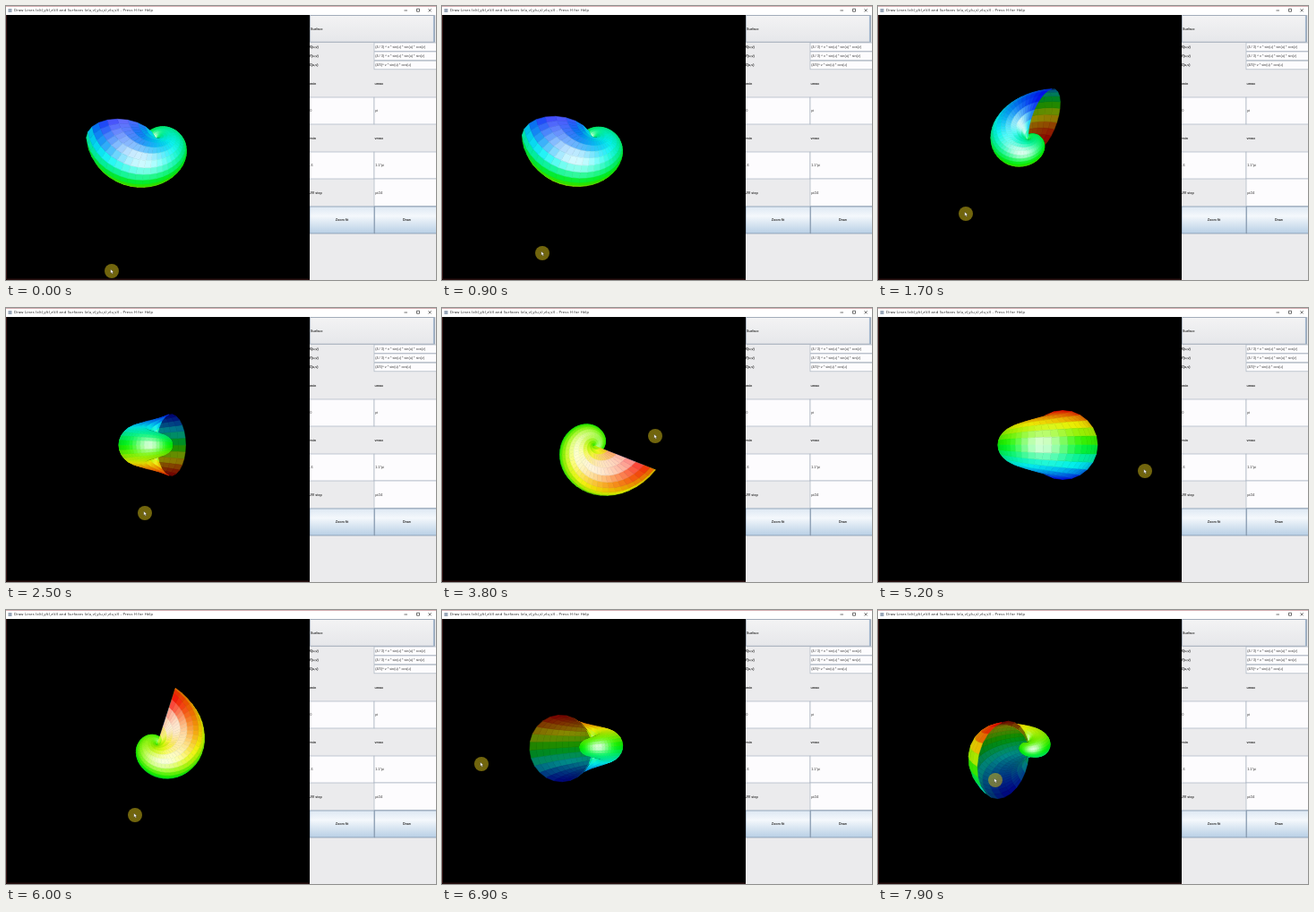
An HTML page with a canvas that plays this animation: 480x306 px, repeating every 8 s.

```html
<!DOCTYPE html>
<html lang="en">
<head>
<meta charset="utf-8">
<title>Surface viewer</title>
<style>
  html, body { margin: 0; width: 100%; height: 100%; overflow: hidden; background: #000; }
  canvas, svg { position: absolute; left: 0; top: 0; width: 480px; height: 306px; }
  text { font-family: "Liberation Sans", Arial, sans-serif; font-size: 3.8px; fill: #333; }
  .title { font-family: "Open Sans", sans-serif; font-size: 4px; fill: #111; }
  .label { font-size: 3.7px; font-weight: bold; }
  .mid { text-anchor: middle; }
  .field { fill: #fdfcfe; stroke: #aab4c0; stroke-width: .7; }
  .button { fill: url(#metal); stroke: #8297ad; stroke-width: .8; }
  .line { fill: none; stroke: #333; stroke-width: .7; }
</style>
</head>
<body>
<canvas id="view" width="480" height="306"></canvas>
<svg viewBox="0 0 480 306">
  <defs>
    <linearGradient id="metal" x2="0" y2="1">
      <stop offset="0" stop-color="#dde8f3"/>
      <stop offset=".35" stop-color="#f4f8fc"/>
      <stop offset="1" stop-color="#b8cfe5"/>
    </linearGradient>
    <linearGradient id="combo" x2="0" y2="1">
      <stop offset="0" stop-color="#f3f3f4"/>
      <stop offset="1" stop-color="#e6e7ea"/>
    </linearGradient>
    <clipPath id="panelClip"><path d="M339 10h141v296h-141z"/></clipPath>
  </defs>

  <path d="M.5 9V305.2H339" fill="none" stroke="#4c2020" stroke-width=".8"/>
  <path d="M0 0h480v10H0z" fill="#fff"/>
  <path d="M0 .4h480" stroke="#b06a70" stroke-width=".6"/>
  <path d="M2.5 3h4v4h-4z" fill="#9aa7b8"/>
  <text class="title" x="9" y="6.2" textLength="155">Draw Lines (x(t),y(t),z(t)) and Surfaces (x(u,v),y(u,v),z(u,v)) - Press H for Help</text>
  <path class="line" d="M444.500 5h3.500M458.500 3.200h3v3h-3zM471.500 3.200l3.200 3.200m0-3.200l-3.200 3.200"/>

  <g clip-path="url(#panelClip)">
    <path d="M339 10h141v296h-141z" fill="#ebebed"/>
    <path d="M339.300 10.500h139.200v29.800h-139.200z" fill="url(#combo)" stroke="#8f9bab" stroke-width=".8"/>
    <path d="M477.500 11v29" stroke="#9fb4cc" stroke-width="1.2"/>
    <g id="form"></g>
  </g>

  <g id="pointer">
    <circle r="8" fill="#c3ae16" fill-opacity=".58"/>
    <path d="M-1.200-2v4.600l1.100-1 .8 1.700.8-.4-.8-1.600h1.500z" fill="#fff" stroke="#222" stroke-width=".3"/>
  </g>
</svg>
<script>
const ctx = document.getElementById('view').getContext('2d');
const pointer = document.getElementById('pointer');

// Form: labels [text, x, y], fields [text, x, y, w, h], buttons likewise
const labels = [
  ['Surface', 340, 26.8], ['X(u,v)', 338.5, 47.2], ['Y(u,v)', 338.5, 57.4], ['Z(u,v)', 338.5, 67.4],
  ['umin', 337.5, 87.8], ['umax', 411.5, 87.8], ['vmin', 337.5, 149.2], ['vmax', 411.5, 149.2],
  ['U/V step', 338, 210]
];
const fields = [
  ['(4 / 3) ^ v * sin(u) * sin(u) * cos(v)', 411, 41, 70, 9.6],
  ['(4 / 3) ^ v * sin(u) * sin(u) * sin(v)', 411, 51, 70, 9.6],
  ['(4/3)^ v * sin(u) * cos(u)', 411, 61.2, 70, 9.6],
  ['0', 338, 102, 73, 30], ['pi', 411, 102, 70, 30],
  ['-6', 338, 163, 73, 30], ['1.1*pi', 411, 163, 70, 30],
  ['pi/24', 411, 193, 70, 30.5]
];
const buttons = [['Zoom fit', 339, 224, 72, 30], ['Draw', 411.4, 224, 72, 30]];

const textAt = (s, x, y, cls) => `<text x="${x}" y="${y}" class="${cls}">${s}</text>`;
const boxAt = (x, y, w, h, cls) => `<rect x="${x}" y="${y}" width="${w}" height="${h}" class="${cls}"/>`;
document.getElementById('form').innerHTML =
  fields.map(([s, x, y, w, h]) => boxAt(x, y, w, h, 'field') + textAt(s, x + 1.2, y + h / 2 + 1.4, '')).join('') +
  buttons.map(([s, x, y, w, h]) => boxAt(x, y, w, h, 'button') + textAt(s, x + w / 2, y + h / 2 + 1.4, 'label mid')).join('') +
  labels.map(([s, x, y]) => textAt(s, x, y, 'label')).join('');

// Vectors
const dot = (a, b) => a[0] * b[0] + a[1] * b[1] + a[2] * b[2];
const cross = (a, b) => [a[1] * b[2] - a[2] * b[1], a[2] * b[0] - a[0] * b[2], a[0] * b[1] - a[1] * b[0]];
const add = (a, b, k = 1) => a.map((v, i) => v + b[i] * k);
const unit = a => { const n = Math.hypot(...a) || 1; return a.map(v => v / n); };

// Poses: time, direction of the shell's lip, direction its opening faces
const pose = (t, lip, open) => {
  const d = unit(lip), n = unit(add(open, d, -dot(open, d)));
  return { t, axes: [d, n, cross(d, n)] };
};
const poses = [
  pose(0, [-1, 0, 0], [0, .79, -.61]),
  pose(900, [-1, .03, .05], [0, .76, -.65]),
  pose(1700, [.53, .69, -.5], [.78, -.4, .47]),
  pose(2500, [.53, 0, -.85], [.85, 0, .53]),
  pose(3800, [.91, -.36, -.2], [.366, .93, 0]),
  pose(5200, [1, 0, 0], [0, 0, -1]),
  pose(6000, [.27, .84, -.47], [-.95, .31, 0]),
  pose(6400, [0, .1, -1], [-1, 0, 0]),
  pose(7100, [-.95, -.1, .3], [.3, 0, .95]),
  pose(7900, [-.57, -.34, .75], [.81, -.14, .55])
];

const path = [
  [0, 118, 296], [900, 112, 276], [1700, 98, 232], [1900, 96, 230], [2500, 155, 229],
  [3200, 205, 185], [3800, 238, 143], [4500, 272, 84], [4700, 280, 86], [5200, 298, 182],
  [5600, 220, 222], [6000, 144, 229], [6300, 118, 208], [6900, 44, 172], [7300, 99, 180], [7900, 131, 190]
].map(([t, x, y]) => ({ t, x, y }));

function between(keys, t) {
  let i = 0;
  while (i < keys.length - 2 && t >= keys[i + 1].t) i++;
  const a = keys[i], b = keys[i + 1];
  return [a, b, Math.min(1, (t - a.t) / (b.t - a.t))];
}

// Turn frame a towards frame b about their common axis
function turn(a, b, k) {
  let sum = [0, 0, 0], trace = 0;
  a.forEach((v, i) => { sum = add(sum, cross(v, b[i])); trace += dot(v, b[i]); });
  const angle = k * Math.atan2(Math.hypot(...sum), trace - 1), axis = unit(sum);
  const c = Math.cos(angle), s = Math.sin(angle);
  return a.map(v => add(add(v.map(x => x * c), cross(axis, v), s), axis, dot(axis, v) * (1 - c)));
}

// Surface grid in lip / opening / z coordinates
const STEP = Math.PI / 24, V0 = -6, V1 = 1.1 * Math.PI;
const U_COUNT = 24, V_COUNT = Math.round((V1 - V0) / STEP);
const Z_MAX = (4 / 3) ** V1 / 2;
const grid = [];
for (let j = 0; j <= V_COUNT; j++) {
  const back = (V_COUNT - j) * (V1 - V0) / V_COUNT, r = (4 / 3) ** (V1 - back);
  for (let i = 0; i <= U_COUNT; i++) {
    const s = Math.sin(i * STEP), c = Math.cos(i * STEP);
    grid.push([r * s * s * Math.cos(back), -r * s * s * Math.sin(back), r * s * c]);
  }
}

const CX = 168, CY = 153, SCALE = 28.5, EYE = 9;
const project = p => {
  const k = SCALE * EYE / (EYE - p[2]);
  return [CX + p[0] * k, CY - p[1] * k];
};

// Rainbow from blue (-1) to red (1)
function rainbow(z) {
  const h = 2 - 2 * z;
  return [2 - h, h < 2 ? h : 4 - h, h - 2].map(v => 255 * Math.max(0, Math.min(1, v)));
}

function shade(z, facing) {
  const c = rainbow(z);
  if (facing < 0) return c.map(v => v * (.4 + .16 * -facing));
  const white = .85 * facing ** 7, light = .84 + .16 * facing;
  return c.map(v => v * light * (1 - white) + 255 * white);
}

function drawShell(axes) {
  const pts = grid.map(g => [0, 1, 2].map(i => g[0] * axes[0][i] + g[1] * axes[1][i] + g[2] * axes[2][i]));
  const flat = pts.map(project);
  const quads = [];
  for (let j = 0; j < V_COUNT; j++) for (let i = 0; i < U_COUNT; i++) {
    const a = j * (U_COUNT + 1) + i, b = a + 1, d = a + U_COUNT + 1, c = d + 1;
    const mid = [0, 1, 2].map(n => (pts[a][n] + pts[b][n] + pts[c][n] + pts[d][n]) / 4);
    const du = add(add(pts[b], pts[c]), add(pts[a], pts[d]), -1);
    const dv = add(add(pts[d], pts[c]), add(pts[a], pts[b]), -1);
    const eye = unit([-mid[0], -mid[1], EYE - mid[2]]);
    const z = (grid[a][2] + grid[c][2]) / 2 / Z_MAX;
    quads.push({ ids: [a, b, c, d], depth: mid[2], rgb: shade(z, dot(unit(cross(du, dv)), eye)) });
  }
  quads.sort((p, q) => p.depth - q.depth);
  ctx.lineWidth = .6;
  ctx.lineJoin = 'round';
  for (const { ids, rgb } of quads) {
    ctx.fillStyle = ctx.strokeStyle = `rgb(${rgb.map(Math.round)})`;
    ctx.beginPath();
    ids.forEach(id => ctx.lineTo(...flat[id]));
    ctx.closePath();
    ctx.fill();
    ctx.stroke();
  }
}

let shown = -1;
function frame() {
  const t = Math.floor(performance.now() % 8000 / 100) * 100;
  if (t !== shown) {
    shown = t;
    ctx.fillStyle = '#000';
    ctx.fillRect(0, 0, 480, 306);
    const [a, b, k] = between(poses, t);
    drawShell(turn(a.axes, b.axes, k));
    const [p, q, m] = between(path, t);
    pointer.setAttribute('transform', `translate(${p.x + (q.x - p.x) * m} ${p.y + (q.y - p.y) * m})`);
  }
  requestAnimationFrame(frame);
}
frame();
</script>
</body>
</html>
```
